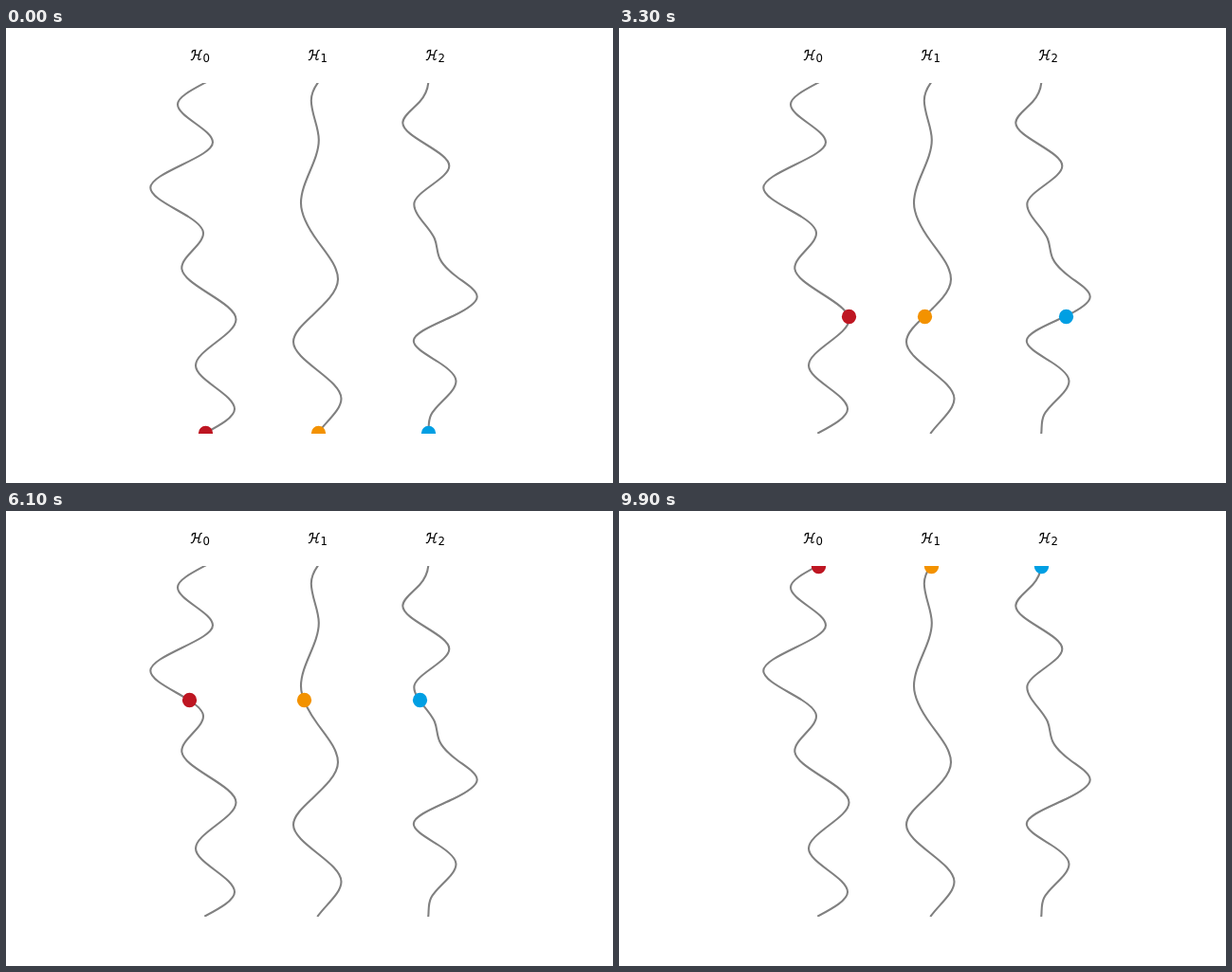
Animation, 640 px wide and 480 px high, one loop 10000 ms. Source, as an HTML page:

```html
<!DOCTYPE html>
<html lang="en">
<head>
<meta charset="utf-8">
<title>Three paths</title>
<style>
  html, body { margin: 0; width: 100%; height: 100%; overflow: hidden; background: #fff; }
  svg { display: block; }
  text { font: 11.67px "DejaVu Sans", sans-serif; }
</style>
</head>
<body>
<svg id="stage" width="640" height="480" viewBox="0 0 640 480">
  <defs>
    <clipPath id="axes"><rect x="80" y="58" width="496" height="370"/></clipPath>
    <path id="scriptH" fill="none" stroke="#000" stroke-width="1.2" stroke-linecap="round"
      d="M1.4-7.8C1.4-9.4 3-10.4 5-10.4C4.7-6.6 3.8-2.4 2.2-.6Q1.4.2.6-.4M11.6-10.4Q10-10.2 9.5-8.2L8.2-2.4Q7.7-.1 9.2-.3L10.6-1M4.2-5.4H8.8"/>
  </defs>
  <g id="lines" clip-path="url(#axes)" fill="none" stroke="#808080" stroke-width="2.08" stroke-linecap="square"></g>
  <g id="dots" clip-path="url(#axes)"></g>
  <g id="labels"></g>
</svg>
<script>
const TOP = 57.6, BOTTOM = 427.2, HEIGHT = BOTTOM - TOP;
const STEPS = 100, STEP_MS = 100;

// Key points [y, x] of each wavy line; every line ends at the x where it began.
const tracks = [
  { color: '#be1622', points: [
    [TOP, 210.2], [80.5, 181], [120.5, 218], [168.5, 152.3], [199.5, 193],
    [216.5, 208], [253, 185.3], [307.5, 242.5], [356, 200], [402, 241]] },
  { color: '#f39200', points: [
    [TOP, 328.9], [76.5, 321.8], [118, 329.8], [184.5, 311], [225, 328.7],
    [265, 350], [304, 322.2], [331, 303], [391, 353.5]] },
  { color: '#009fe3', points: [
    [TOP, 445.3], [78, 436], [100, 418.3], [145.5, 467.3], [186, 430.3],
    [222, 451.8], [243, 457.2], [263, 476], [283.5, 496.7], [304, 471],
    [330, 429.8], [352.5, 456], [372.5, 474.5], [408, 448.2]] }
];

function add(parentId, tag, attrs, content = '') {
  const node = document.createElementNS('http://www.w3.org/2000/svg', tag);
  for (const key in attrs) node.setAttribute(key, attrs[key]);
  node.textContent = content;
  return document.getElementById(parentId).appendChild(node);
}

// Periodic spline: flat at turning points, continuous curvature at the others.
function makeSpans(points) {
  const n = points.length;
  const slopes = points.map(() => 0);
  const spans = points.map(([y, x], i) => {
    const [nextY, nextX] = points[i + 1] ?? [BOTTOM, points[0][1]];
    return { y, x, nextX, height: nextY - y, rise: (nextX - x) / (nextY - y) };
  });
  for (let pass = 0; pass < 30; pass++) {
    spans.forEach((after, i) => {
      const prev = (i + n - 1) % n, before = spans[prev];
      if (before.rise * after.rise <= 0) return;
      const a = 1 / before.height, b = 1 / after.height;
      const pull = 3 * (a * before.rise + b * after.rise);
      slopes[i] = (pull - a * slopes[prev] - b * slopes[(i + 1) % n]) / (2 * (a + b));
    });
  }
  spans.forEach((span, i) => {
    span.c1 = span.x + slopes[i] * span.height / 3;
    span.c2 = span.nextX - slopes[(i + 1) % n] * span.height / 3;
  });
  return spans;
}

function curvePath(spans) {
  const curves = spans.map(({ y, height, c1, c2, nextX }) =>
    `C${c1} ${y + height / 3} ${c2} ${y + height * 2 / 3} ${nextX} ${y + height}`);
  return `M${spans[0].x} ${TOP}` + curves.join('');
}

function xAt(spans, y) {
  const span = spans.findLast(s => s.y <= y) ?? spans[0];
  const u = (y - span.y) / span.height, v = 1 - u;
  return v ** 3 * span.x + 3 * v * v * u * span.c1 + 3 * v * u * u * span.c2 + u ** 3 * span.nextX;
}

tracks.forEach((track, i) => {
  const labelX = 205 + 124 * i;
  track.spans = makeSpans(track.points);
  add('lines', 'path', { d: curvePath(track.spans) });
  track.dot = add('dots', 'circle', { r: 7.64, fill: track.color });
  add('labels', 'use', { href: '#scriptH', x: labelX - 10.3, y: 33.8 });
  add('labels', 'text', { x: labelX + 2.5, y: 36 }, String(i));
});

// Dots sit on whole pixel centres.
const snap = value => Math.round(value) + 0.5;

function draw(ms) {
  const step = Math.floor(ms / STEP_MS) % STEPS;
  const y = BOTTOM - HEIGHT * step / (STEPS - 1);
  for (const { dot, spans } of tracks) {
    dot.setAttribute('cx', snap(xAt(spans, y)));
    dot.setAttribute('cy', snap(y));
  }
}

let start;
function tick(now) {
  start ??= now;
  draw(now - start);
  requestAnimationFrame(tick);
}
draw(0);
requestAnimationFrame(tick);
</script>
</body>
</html>
```
